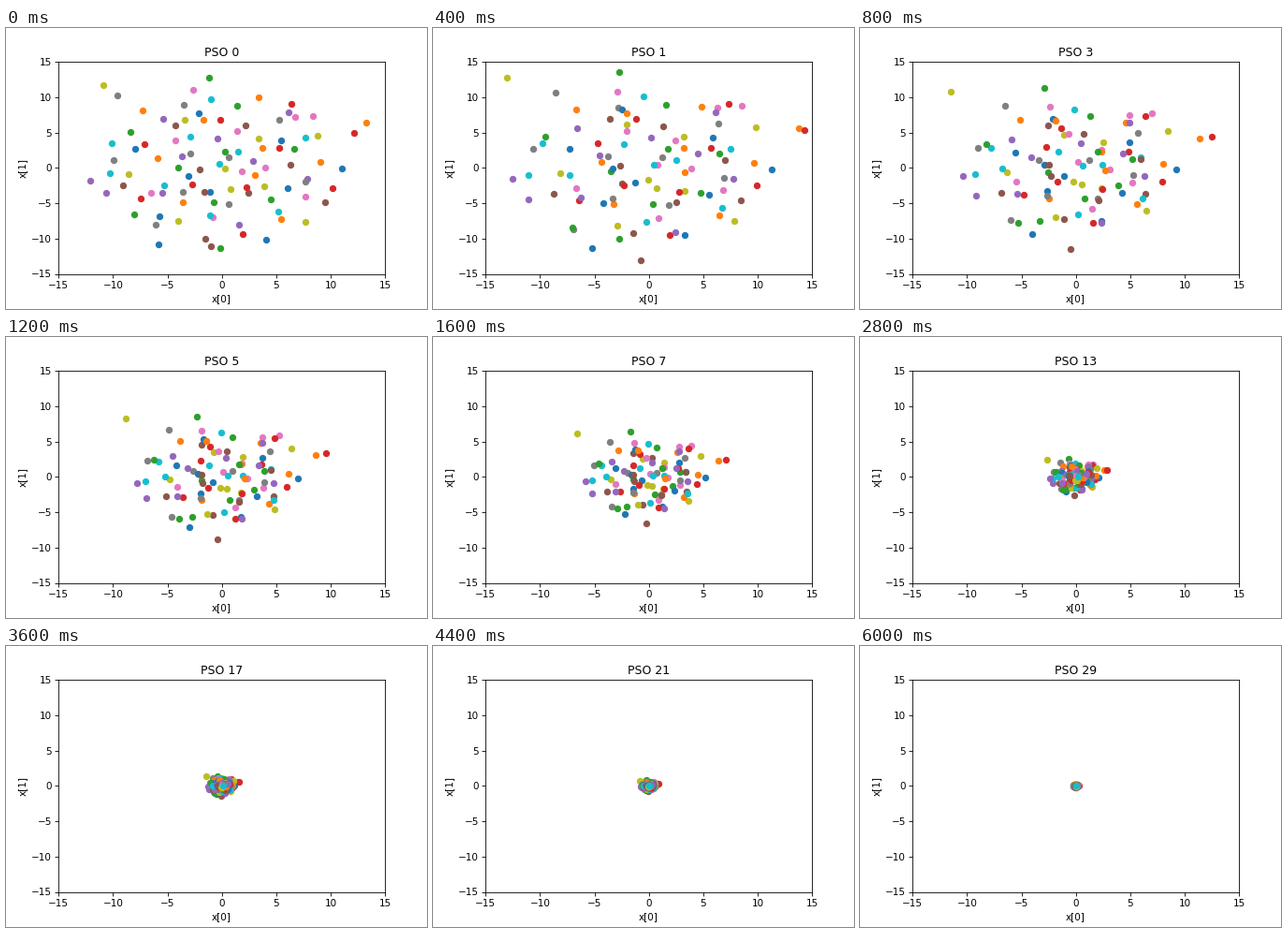
Recreate the animation shown at these times as a matplotlib script. Size 450 px wide and 300 px high, loop 6.2 s.

```python
import numpy as np
import matplotlib.pyplot as plt
from matplotlib.animation import FuncAnimation

COUNT, TICKS, INTERVAL = 100, 31, 200
SLOW, FAST = 0.86, 0.4   # decay per step of the pull and of the first kick
GOLDEN = np.pi * (3 - np.sqrt(5))

# Outermost particle of each colour: x, y at step 0, then x, y at step 3
RIM = np.array([
    (-5.8, -10.8, -4, -9.4),
    (13.3, 6.4, 11.4, 4.2),
    (-1.2, 12.8, -2.9, 11.3),
    (12.2, 5, 12.5, 4.4),
    (-10.6, -3.5, -9.2, -4),
    (-1, -11.1, -0.5, -11.5),
    (8.4, 7.3, 7, 7.7),
    (-9.6, 10.2, -6.5, 8.8),
    (-10.9, 11.7, -11.5, 10.8),
    (-10.3, -0.8, -9.3, -0.9),
])


def build_swarm():
    """Positions at steps 0 and 3: the rim, then a jittered spiral inwards."""
    rng = np.random.default_rng(4)
    i = np.arange(COUNT - len(RIM))
    radius = 11.5 * (1 - i / len(i)) ** 0.65
    spiral = radius * np.array([np.cos(i * GOLDEN), np.sin(i * GOLDEN)])
    start = spiral.T + rng.normal(0, 0.7, (len(i), 2))
    third = 0.82 * start + rng.normal(0, 1.1, start.shape)
    return np.vstack([RIM[:, :2], start]), np.vstack([RIM[:, 2:], third])


start, third = build_swarm()
pull = (third - FAST**3 * start) / (SLOW**3 - FAST**3)
kick = start - pull

fig = plt.figure(figsize=(6, 4), dpi=75, facecolor="white")
fig.subplots_adjust(left=0.125, right=0.9, bottom=0.125, top=0.88)
ax = fig.add_subplot()
ax.set(xlim=(-15, 15), ylim=(-15, 15), xlabel="x[0]", ylabel="x[1]")
title = ax.set_title("PSO 0")
dots = [ax.plot([x], [y], "o")[0] for x, y in start]   # default colour cycle


def update(tick):
    step = max(0, tick - 1)   # the opening pose is held for two ticks
    for dot, (x, y) in zip(dots, pull * SLOW**step + kick * FAST**step):
        dot.set_data([x], [y])
    title.set_text(f"PSO {step}")
    return *dots, title


anim = FuncAnimation(fig, update, frames=TICKS, interval=INTERVAL,
                     repeat=True, repeat_delay=0, blit=False)
plt.show()
```
